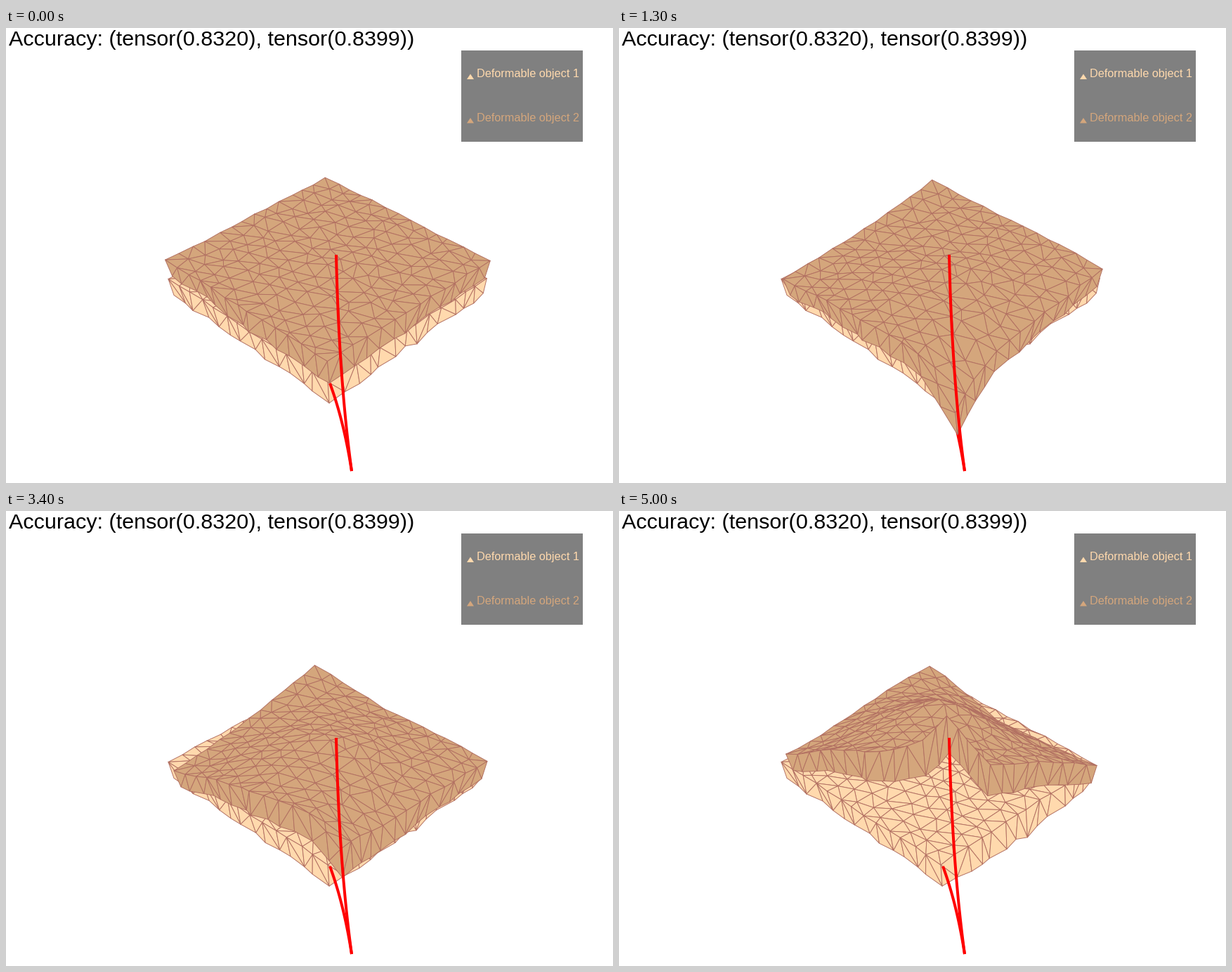
Write a matplotlib script that moves like this. It is 864 px wide and 648 px high and loops after 5100 ms.

```python
import numpy as np
import matplotlib.pyplot as plt
from matplotlib.animation import FuncAnimation
from matplotlib.collections import PolyCollection
from matplotlib.tri import Triangulation

W, H, DPI = 864, 648, 100
PX = 72 / DPI
FRAMES, STEP = 51, 100
N = 13  # mesh cells along one side

LIGHT, TAN, EDGE = "#ffd9ad", "#d4a67c", "#b27062"

# The grabbed corner follows these curves: first pulled down, then lifted.
PULL = np.array([(461, 506), (481, 560), (492, 631)])
LIFT = np.array([(492, 631), (474, 500), (470, 323)])
PULL_END, LIFT_START, LIFT_END = 2100, 2250, 5000
GRIP_OFFSET = np.array([3, 31])  # from the sheet's front corner to the grip

# Front, right, left and back corners of the undeformed upper sheet.
REST = [(458, 475), (689, 331), (228, 331), (455, 213)]

# Sheet point: (place when pulled, place when lifted).
# (0,0) is front, (1,0) right, (0,1) left, (1,1) back.
KEY_POINTS = {
    (1, 0): [(687, 353), (680, 362)],
    (0, 1): [(241, 382), (239, 347)],
    (1, 1): [(439, 219), (443, 221)],
    (.3, 0): [(538, 492), (526, 360)],
    (0, .12): [(441, 493), (440, 322)],
    (0, .35): [(372, 440), (378, 344)],
    (.5, 1): [(338, 310), (342, 283)],
    (1, .6): [(541, 276), (540, 300)],
    (.5, .5): [(460, 345), (462, 270)],
}


def bezier(ctrl, s):
    s = np.asarray(s, float)[..., None]
    return (1 - s)**2 * ctrl[0] + 2 * s * (1 - s) * ctrl[1] + s**2 * ctrl[2]


def project(uv, front, right, left, back):
    """Perspective map of the unit square onto four corners."""
    f, r, l, b = (np.array(p, float) for p in (front, right, left, back))
    g, h = np.linalg.solve(np.column_stack([r - b, l - b]), f - r + b - l)
    u, v = uv[:, :1], uv[:, 1:]
    top = f + u * (r * (1 + g) - f) + v * (l * (1 + h) - f)
    return top / (1 + g * u + h * v)


def kernel(p, q):
    return np.linalg.norm(p[:, None] - q[None], axis=2)**1.5


def spline_weights(uv, handles):
    """Matrix taking handle shifts to smooth shifts of all points."""
    k = len(handles)
    poly = np.column_stack([np.ones(k), handles])
    system = np.block([[kernel(handles, handles), poly],
                       [poly.T, np.zeros((3, 3))]])
    basis = np.column_stack([kernel(uv, handles), np.ones(len(uv)), uv])
    return basis @ np.linalg.inv(system)[:, :k]


class Slab:
    """Top sheet plus the two visible front sides."""

    def __init__(self, seed):
        rng = np.random.default_rng(seed)

        def side():
            e = np.linspace(0, 1, N + 1)
            e[1:-1] += rng.uniform(-.15, .15, N - 1) / N
            return e

        pts = [(0, e) for e in side()[::-1]] + [(e, 0) for e in side()[1:]]
        pts += [(e, 1) for e in side()[1:]] + [(1, e) for e in side()[1:-1]]
        for j in range(1, N):
            for i in np.arange(1 - .5 * (j % 2), N):
                pts.append(np.add((i, j), rng.uniform(-.25, .25, 2)) / N)
        self.uv = np.array(pts)
        self.wobble = rng.uniform(-1.4, 1.4, self.uv.shape)
        self.rim = 2 * N + 1
        self.rough = rng.uniform(-1, 1, (self.rim, 2)) * (4, 2.5)
        self.rough[[0, N, -1]] = 0

        tris = Triangulation(*self.uv.T).triangles
        depth = self.uv[tris].sum(axis=(1, 2))
        faces = list(tris[np.argsort(-depth)])  # back to front
        base = len(self.uv)
        for i in range(self.rim - 1):
            a, b, c, d = i, i + 1, base + i, base + i + 1
            if rng.random() < .5:
                faces += [(a, b, c), (b, d, c)]
            else:
                faces += [(a, b, d), (a, d, c)]
        self.faces = np.array(faces)

    def polygons(self, top, drops, bulge=0):
        """Faces for given top points; drops are left, front, right heights."""
        at = np.linspace(-1, 1, self.rim)
        drop = np.column_stack([np.interp(at, [-1, 0, 1], c)
                                for c in zip(*drops)])
        drop[:, 1] += bulge * np.sin(np.pi * at.clip(0, 1))
        bottom = top[:self.rim] + drop + self.rough
        return np.vstack([top, bottom])[self.faces]


lower, upper = Slab(4), Slab(11)
handles = np.array([(0, 0), *KEY_POINTS])
handle_rest = project(handles, *REST)
pulled, lifted = np.array(list(KEY_POINTS.values())).swapaxes(0, 1)
rest_top = project(upper.uv, *REST) + upper.wobble
weights = spline_weights(upper.uv, handles)


def progress(t, start, end):
    return float(np.clip((t - start) / (end - start), 0, 1))


def lower_polygons(t):
    late = progress(t, PULL_END + 500, LIFT_END)
    right = (685 - 6 * late, 356 + 5 * late)
    top = project(lower.uv, (459, 503), right, (232, 357), (452, 238))
    drops = [(8, 23), (2, 30), (-5, 21)]
    return lower.polygons(top + lower.wobble, drops, 12 * late)


def upper_polygons(t):
    pull = progress(t, 0, PULL_END)
    lift = progress(t, LIFT_START, LIFT_END)
    grip = bezier(LIFT, lift) if lift else bezier(PULL, pull)
    # The rest of the sheet lags behind the grip.
    body = handle_rest[1:] + pull**1.3 * (pulled - handle_rest[1:])
    body += lift**1.3 * (lifted - pulled)
    target = np.vstack([grip - GRIP_OFFSET, body])
    top = rest_top + weights @ (target - handle_rest)
    drops = [(10, 23), GRIP_OFFSET + (0, 22 * lift), (-8, 25)]
    return upper.polygons(top, drops)


fig = plt.figure(figsize=(W / DPI, H / DPI), dpi=DPI, facecolor="white")
ax = fig.add_axes([0, 0, 1, 1])
ax.set_xlim(0, W)
ax.set_ylim(H, 0)
ax.axis("off")


def add_slab(color, z):
    art = PolyCollection([], facecolor=color, edgecolor=EDGE,
                         linewidth=.95 * PX, zorder=z)
    return ax.add_collection(art, autolim=False)


def add_path(ctrl, z):
    x, y = bezier(ctrl, np.linspace(0, 1, 40)).T
    ax.plot(x, y, color="red", lw=4 * PX, zorder=z, solid_capstyle="butt")


def add_text(x, y, text, size, color):
    ax.text(x, y, text, family="Liberation Sans", size=size * PX,
            color=color, va="baseline", zorder=5)


lower_art, upper_art = add_slab(LIGHT, 1), add_slab(TAN, 3)
add_path(PULL, 2)
add_path(LIFT, 4)

add_text(4, 25, "Accuracy: (tensor(0.8320), tensor(0.8399))", 30.5, "black")
ax.add_patch(plt.Rectangle((648, 32), 173, 130, color="#808080", lw=0))
for i, color in enumerate((LIGHT, TAN)):
    y = 70 + 62.5 * i
    ax.add_patch(plt.Polygon([(661, y - 4.5), (666, y + 3), (656, y + 3)],
                             color=color, lw=0, zorder=5))
    add_text(670, y, f"Deformable object {i + 1}", 16.2, color)


def draw(frame):
    t = frame * STEP
    lower_art.set_verts(lower_polygons(t))
    upper_art.set_verts(upper_polygons(t))
    return lower_art, upper_art


anim = FuncAnimation(fig, draw, frames=FRAMES, interval=STEP, repeat=True,
                     repeat_delay=0)
plt.show()
```
